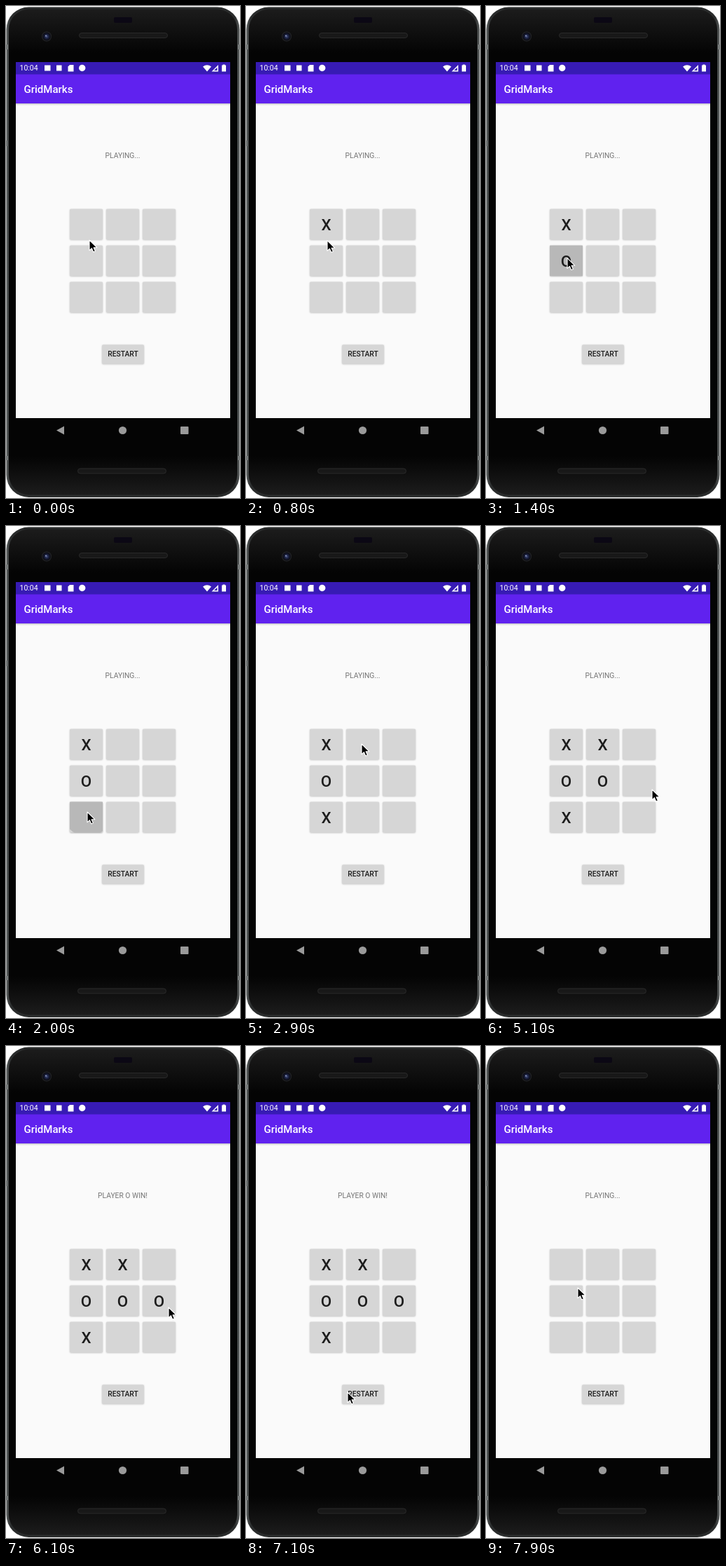
Write an HTML page that moves like this. It is 334 by 702 pixels and loops after 8 s.

```html
<!DOCTYPE html>
<html lang="en">
<head>
<meta charset="utf-8">
<title>Noughts and crosses on a phone</title>
<style>
  html, body { margin: 0; width: 100%; height: 100%; overflow: hidden; background: #fff; }
  svg { display: block; }
  text { font-family: Roboto, sans-serif; }
  .medium { font-weight: 500; }
  .mid { text-anchor: middle; }
</style>
</head>
<body>
<svg width="334" height="702" viewBox="0 0 334 702">
  <defs>
    <linearGradient id="rim">
      <stop offset="0" stop-color="#5a5e5e"/><stop offset=".02" stop-color="#2a2c2c"/>
      <stop offset=".98" stop-color="#2a2c2c"/><stop offset="1" stop-color="#5a5e5e"/>
    </linearGradient>
    <linearGradient id="glass" x2="0" y2="1">
      <stop offset="0" stop-color="#1c1c1c"/><stop offset=".09" stop-color="#040404"/>
      <stop offset=".92" stop-color="#040404"/><stop offset="1" stop-color="#1c1c1c"/>
    </linearGradient>
    <linearGradient id="barShadow" x2="0" y2="1">
      <stop stop-color="#c6c6c8"/><stop offset="1" stop-color="#fafafa"/>
    </linearGradient>
    <radialGradient id="lens">
      <stop offset="0" stop-color="#4a5686"/><stop offset=".4" stop-color="#1a2040"/>
      <stop offset=".75" stop-color="#0c0d14"/><stop offset="1" stop-color="#2a2b2e"/>
    </radialGradient>
    <filter id="soft" x="-20%" y="-20%" width="140%" height="140%"><feGaussianBlur stdDeviation="1"/></filter>
  </defs>

  <!-- phone body -->
  <rect x=".5" y="1.500" width="333" height="699.500" rx="32" fill="url(#rim)"/>
  <path d="M0 55h3v7h-3zM331 55h3v7h-3zM0 642h3v6h-3zM331 642h3v6h-3zM0 192h2v8h-2z" fill="#777b7b"/>
  <rect x="4" y="4.500" width="326" height="693" rx="29" fill="url(#glass)"/>
  <rect x="154" y="16" width="26" height="8" rx="2" fill="#0b0814"/>
  <circle cx="58" cy="43.500" r="7" fill="url(#lens)"/>
  <circle cx="57" cy="42.500" r="1" fill="#98a2c4"/>
  <g fill="#181818" stroke="#2a2a2a">
    <rect x="104.500" y="38.500" width="126" height="7" rx="3.500"/>
    <rect x="102.500" y="660" width="126" height="7" rx="3.500"/>
  </g>

  <!-- screen -->
  <rect x="14" y="80" width="306" height="508" fill="#fafafa"/>
  <rect x="14" y="139" width="306" height="3" fill="url(#barShadow)"/>
  <rect x="14" y="97" width="306" height="42" fill="#6022ef"/>
  <rect x="14" y="80" width="306" height="17.500" fill="#371bb4"/>
  <g fill="#fff">
    <text x="19.500" y="92.300" font-size="10.500">10:04</text>
    <text class="medium" x="25.500" y="124" font-size="15">GridMarks</text>
    <rect x="55" y="84.500" width="8.500" height="8"/>
    <rect x="72" y="84.500" width="7.500" height="8"/>
    <path d="M91 84h5.500v9.500h-8v-7z"/>
    <circle cx="108.700" cy="88.500" r="4.700"/>
    <path d="M281 86.500q6-4.500 12 0l-6 7zM303 84v9.500h-9.500z"/>
    <path d="M309.500 83.500h3v1h1.500v9h-6v-9h1.500z"/>
  </g>
  <path d="M301.500 87.500v4.500h-4.500z" fill="#371bb4"/>
  <g fill="#9a9a9a">
    <path d="M72 605.500l11-6v12z"/>
    <circle cx="166.500" cy="605.500" r="5.600"/>
    <rect x="249" y="600" width="11.500" height="11" rx="1"/>
  </g>

  <text id="status" class="mid" x="166.500" y="216.600" font-size="10.300" fill="#757575"></text>
  <g id="buttons"></g>
  <path id="cursor" d="M0 0V14.800L3.400 11.700 5.700 17 8.400 15.800 6.100 10.700H10.800Z"
        fill="#000" stroke="#fff" stroke-width="1.100" stroke-linejoin="round"/>
</svg>

<script>
const LOOP = 8000, STEP = 100, HOLD = 200, FADE = 200, MOVE = 500, RESTART = 9;

// [press time, button]; X and O take turns, the sixth mark wins, then the board is cleared
const clicks = [[300, 0], [1200, 3], [1900, 6], [3600, 4], [4600, 1], [5300, 5], [7400, RESTART]];
const [winAt, resetAt] = clicks.slice(-2).map(([press]) => press + HOLD);

// [arrival time, x, y] of the pointer tip
const stops = [
  [0, 119, 334], [300, 116, 324], [1100, 116, 354], [1800, 116, 408],
  [2700, 165, 311], [3400, 165, 356], [3800, 172, 339], [4300, 166, 318],
  [5100, 237, 376], [5300, 232, 373], [6800, 145, 494], [7900, 131, 345]
];

const $ = id => document.getElementById(id);
const clamp = v => Math.max(0, Math.min(1, v));
const set = (el, attrs) => { for (const name in attrs) el.setAttribute(name, attrs[name]); };

// Rests at each stop and leaves at most MOVE ms before the next arrival.
function pointerAt(t) {
  const i = stops.findIndex(stop => stop[0] > t);
  if (i < 0) return stops.at(-1).slice(1);
  const [t0, x0, y0] = stops[i - 1], [t1, x1, y1] = stops[i];
  const leave = Math.max(t0, t1 - MOVE);
  const k = clamp((t - leave) / (t1 - leave)), eased = k * k * (3 - 2 * k);
  return [x0 + (x1 - x0) * eased, y0 + (y1 - y0) * eased];
}

function makeButton(x, y, w, h, size, baseline) {
  const group = document.createElementNS('http://www.w3.org/2000/svg', 'g');
  group.innerHTML = `
    <rect x="${x}" y="${y + .6}" width="${w}" height="${h}" rx="2" filter="url(#soft)"/>
    <svg x="${x}" y="${y}" width="${w}" height="${h}">
      <rect width="${w}" height="${h}" rx="1.5" fill="#d6d6d6"/>
      <circle/>
      <text class="mid medium" x="${w / 2}" y="${baseline}" font-size="${size}" fill="#1d1d1d"></text>
    </svg>`;
  $('buttons').append(group);
  const [shadow, ripple, label] = ['rect', 'circle', 'text'].map(tag => group.querySelector(tag));
  return { x, y, shadow, ripple, label };
}

const buttons = Array.from({ length: 9 }, (_, i) =>
  makeButton(91 + i % 3 * 52, 289.4 + Math.floor(i / 3) * 52, 47, 44, 22.3, 30.6));
buttons.push(makeButton(137, 483.2, 60, 27.5, 10.3, 17.2));
buttons[RESTART].label.textContent = 'RESTART';

function drawButton(button, index, t) {
  const turn = clicks.findIndex(click => click[1] === index);
  const press = turn < 0 ? LOOP : clicks[turn][0], release = press + HOLD;
  const held = t >= press && t < release;
  const level = t < press ? 0 : clamp(1 - (t - release) / FADE);
  const [px, py] = pointerAt(press);

  set(button.shadow, { opacity: held ? .32 : .22 });
  set(button.ripple, {
    cx: px - button.x, cy: py - button.y,
    r: level && 18 + (t - press) * .17, opacity: level * .14
  });
  if (index !== RESTART) {
    button.label.textContent = t >= release && t < resetAt ? 'XO'[turn % 2] : '';
  }
}

function draw(now) {
  const t = Math.floor(now % LOOP / STEP) * STEP;
  buttons.forEach((button, i) => drawButton(button, i, t));
  $('status').textContent = t >= winAt && t < resetAt ? 'PLAYER O WIN!' : 'PLAYING...';
  set($('cursor'), { transform: `translate(${pointerAt(t)})` });
}

const start = performance.now();
function frame() {
  draw(performance.now() - start);
  requestAnimationFrame(frame);
}
frame();
</script>
</body>
</html>
```
